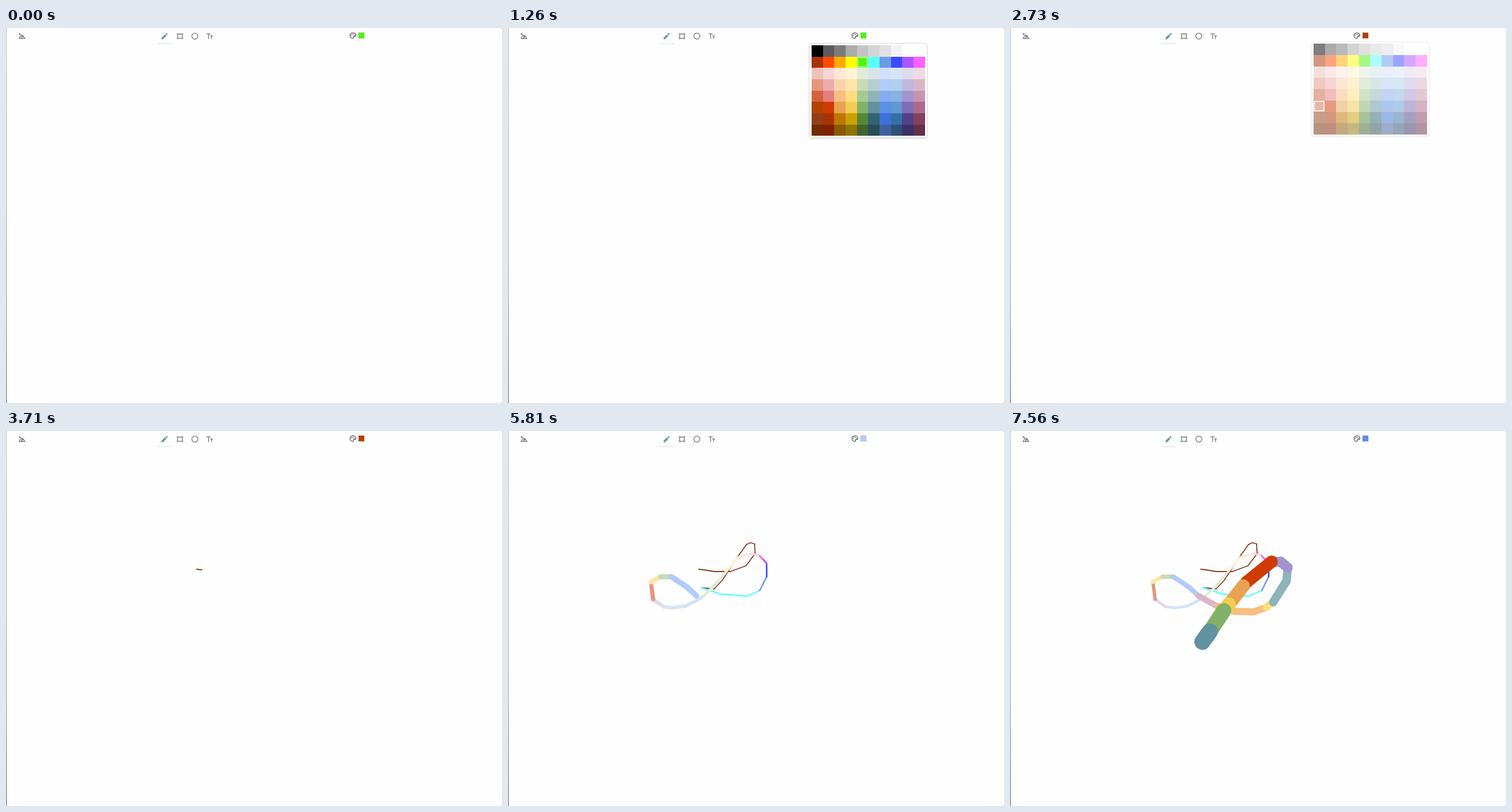
Recreate the animation shown at these times as an HTML page. Size 861 by 651 pixels, loop 7630 ms.

```html
<!DOCTYPE html>
<html lang="en">
<head>
<meta charset="utf-8">
<title>Drawing board</title>
<style>
  html, body { margin: 0; width: 100%; height: 100%; overflow: hidden; background: #fefefe; }
  svg { display: block; }
  .icon { fill: none; stroke: #767676; stroke-width: 1.3; }
  #ink line { stroke-linecap: round; }
</style>
</head>
<body>
<svg id="stage" width="861" height="651" viewBox="0 0 861 651">
  <defs>
    <linearGradient id="edge" x1="0" y1="0" x2="0" y2="1">
      <stop offset="0" stop-color="#bbb"/>
      <stop offset=".7" stop-color="#999"/>
      <stop offset="1" stop-color="#555"/>
    </linearGradient>
    <filter id="shadow" x="-10%" y="-10%" width="120%" height="120%">
      <feDropShadow dx="0" dy="1" stdDeviation="1.5" flood-opacity=".14"/>
    </filter>
  </defs>

  <rect width="861" height="651" fill="#fefefe"/>
  <rect width="1" height="651" fill="url(#edge)"/>
  <path d="M858 0h3v3q0-3-3-3M858 651h3v-3q0 3-3 3M0 0h3q-3 0-3 3" fill="#bbb"/>

  <g id="toolbar">
    <g class="icon" stroke-width="1.1">
      <path d="M22.5 18.4l4-6.4 2.9 5M26 18.4l3.2-5.6 3.6 5.6zM22.3 18.4h10.5"/>
      <path d="M22 10.6h3.4M23.7 9v3.2"/>
    </g>
    <path d="M270 19.5v-2.6l6-6 2.6 2.6-6 6zM276.8 10.1l1.2-1.2q.6-.5 1.2 0l1.2 1.2q.5.6 0 1.2l-1.2 1.2z" fill="#5b9da0"/>
    <path d="M262 27h27" stroke="#d2dfdf"/>
    <g class="icon">
      <path d="M299 10.5h6M299 17.8h6M297.9 11.5v5.4M306 11.5v5.4"/>
      <g stroke-width="1">
        <circle cx="297.9" cy="10.5" r="1.3"/><circle cx="306" cy="10.5" r="1.3"/>
        <circle cx="297.9" cy="17.8" r="1.3"/><circle cx="306" cy="17.8" r="1.3"/>
      </g>
      <circle cx="327.8" cy="14.1" r="5.2"/>
      <path d="M348 10.1h7.4M351.7 10.1v9M354.3 13.6h5M356.8 13.6v5.6"/>
    </g>
    <path d="M602 8.2a5 5 0 1 0 0 10c1.2 0 1.5-1 1-1.8s0-1.8 1-1.8h1.300c1 0 1.900-.8 1.900-2 0-2.600-2.400-4.400-5.200-4.400z" fill="none" stroke="#444" stroke-width="1.100"/>
    <g fill="#444">
      <circle cx="599.2" cy="13" r=".8"/><circle cx="600.6" cy="10.9" r=".8"/>
      <circle cx="603.3" cy="10.9" r=".8"/><circle cx="605" cy="12.7" r=".8"/>
    </g>
    <rect id="swatch" x="612" y="8" width="10" height="10" stroke-opacity=".35" stroke="#999" stroke-width=".8"/>
  </g>

  <g id="ink"></g>

  <g id="picker">
    <rect x="523" y="26.500" width="204.500" height="164" rx="4" fill="#fff" stroke="#dcdcdc" filter="url(#shadow)"/>
    <g id="cells" shape-rendering="crispEdges"></g>
    <rect id="chosen" width="16.500" height="16.500" stroke-width="2"/>
  </g>
</svg>

<script>
const LOOP = 7630, STEP = 70;
const CELL = 19.7, COLUMNS = 10;
const GREEN = 14, BROWN = 50, FINAL = 56;
const PICK_TIME = 2240;

const palette = `
  000000 5b5b5b 7b7b7b ababab c4c4c4 d5d5d5 e0e0e0 f3f3f3 ffffff ffffff
  a83300 ff4a00 ffab00 ffff00 4cf50a 59ffff 6b9aea 3a4aff ad55ff ff60ff
  ecc3b9 f6d5d5 fde8d5 fef3d2 e0ecd9 d8e4e6 d2e1fb d6e5f5 e0daed ecdae4
  e29781 edabab fbd2ab fde5a5 c5dcb5 b5cdd3 b3cbf9 b2cfec c2b7de dab5c8
  d2633f e37f7f f7be80 ffdd7f a6ca92 8fb3bb 85acf0 8ab3e2 a394d0 c892b0
  b04300 d03a00 e7a352 f2cc4f 83b168 62929f 5d8fe2 6099d2 7f6db5 b0688c
  943e1c a83300 bf7700 c9a200 548737 31646f 3e70da 3470a8 52408a 85405f
  702c00 7f2000 8a5900 8e7500 42622e 2a4c57 405f9e 2d5278 3b3166 64304a
`.trim().split(/\s+/).map(hex => '#' + hex);

const byId = id => document.getElementById(id);
const clamp = v => Math.max(0, Math.min(1, v));
const parsePoints = text => text.trim().split(/\s+/).map(p => p.split(',').map(Number));

function add(parent, tag, attributes) {
  const node = document.createElementNS('http://www.w3.org/2000/svg', tag);
  for (const name in attributes) node.setAttribute(name, attributes[name]);
  return parent.appendChild(node);
}

palette.forEach((fill, i) => {
  add(byId('cells'), 'rect', {
    x: 526.8 + (i % COLUMNS) * CELL,
    y: 29.8 + Math.floor(i / COLUMNS) * CELL,
    width: CELL, height: CELL, fill
  });
});

const segments = [];
let pen;

// Each point is x,y and the palette index of the segment that ends there.
function addSpan(start, end, text) {
  const points = parsePoints(text);
  points.forEach(([x, y, index], i) => {
    const brown = index === undefined;
    const color = brown ? '#8a3826' : palette[index];
    const width = brown ? 1.8 : 2.4 * Math.pow(11.25, (index - 15) / 40);
    const time = points.length > 1 ? start + (end - start) * i / (points.length - 1) : start;
    const node = add(byId('ink'), 'line', { x1: pen[0], y1: pen[1], x2: x, y2: y, stroke: color });
    segments.push({ node, time, width, index: brown ? BROWN : index });
    pen = [x, y];
  });
}

pen = [331, 240];
addSpan(3710, 4410, `340,241 358,244 386,244 413,234 429,213 428,196
  421,194 414,197 399,218 372,259 358,274`);
addSpan(4480, 4620, '346,273 335,272');
addSpan(4830, 5530, `369,283,15 414,287,15 437,277,15 449,253,16 449,230,17 442,222,18
  435,215,19 420,213,21 400,219,22 378,245,23 352,275,24 335,290,24
  308,304,26 285,307,27 270,305,27 252,292,28`);
addSpan(5570, 5810, '248,262,30 265,253,33 283,253,34 285,254,35 312,272,36 327,286,36');
addSpan(5880, 7070, `361,305,39 390,313,42 423,314,42 445,306,42 457,297,43 480,260,45
  482,237,45 470,227,48 453,227,48 454,227,50 411,262,51 405,269,51
  380,301,52 371,312,53 347,348,54 334,366,55`);

function drawPicker(t) {
  const shown = t < 2000 ? clamp((t - 1000) / 250) : clamp(1 - (t - 2560) / 340);
  const picker = byId('picker');
  picker.setAttribute('opacity', shown);
  picker.setAttribute('transform', `translate(0 ${-5 * (1 - shown)})`);

  const picked = t >= PICK_TIME;
  const index = picked ? BROWN : GREEN;
  const chosen = byId('chosen');
  chosen.setAttribute('x', 528.4 + (index % COLUMNS) * CELL);
  chosen.setAttribute('y', 31.4 + Math.floor(index / COLUMNS) * CELL);
  chosen.setAttribute('fill', picked ? '#c9705c' : '#4cf50a');
  chosen.setAttribute('stroke', picked ? '#f3dfd9' : '#aef39a');
}

// Fresh ink is slightly wider and settles with age.
function drawInk(t) {
  for (const { node, time, width } of segments) {
    const age = t - time;
    const extra = width > 4 ? 1.2 * clamp(1 - (age - 350) / 700) : 0;
    node.setAttribute('visibility', age >= 0 ? 'visible' : 'hidden');
    node.setAttribute('stroke-width', width + extra);
  }
}

function drawSwatch(t) {
  let index = t < PICK_TIME ? GREEN : BROWN;
  for (const segment of segments) if (segment.time <= t) index = segment.index;
  if (t >= 7210) index = FINAL;
  byId('swatch').setAttribute('fill', palette[index]);
}

const origin = performance.now();

function render() {
  const elapsed = (performance.now() - origin) % LOOP;
  const t = Math.floor(elapsed / STEP) * STEP;
  drawPicker(t);
  drawInk(t);
  drawSwatch(t);
  requestAnimationFrame(render);
}
render();
</script>
</body>
</html>
```
